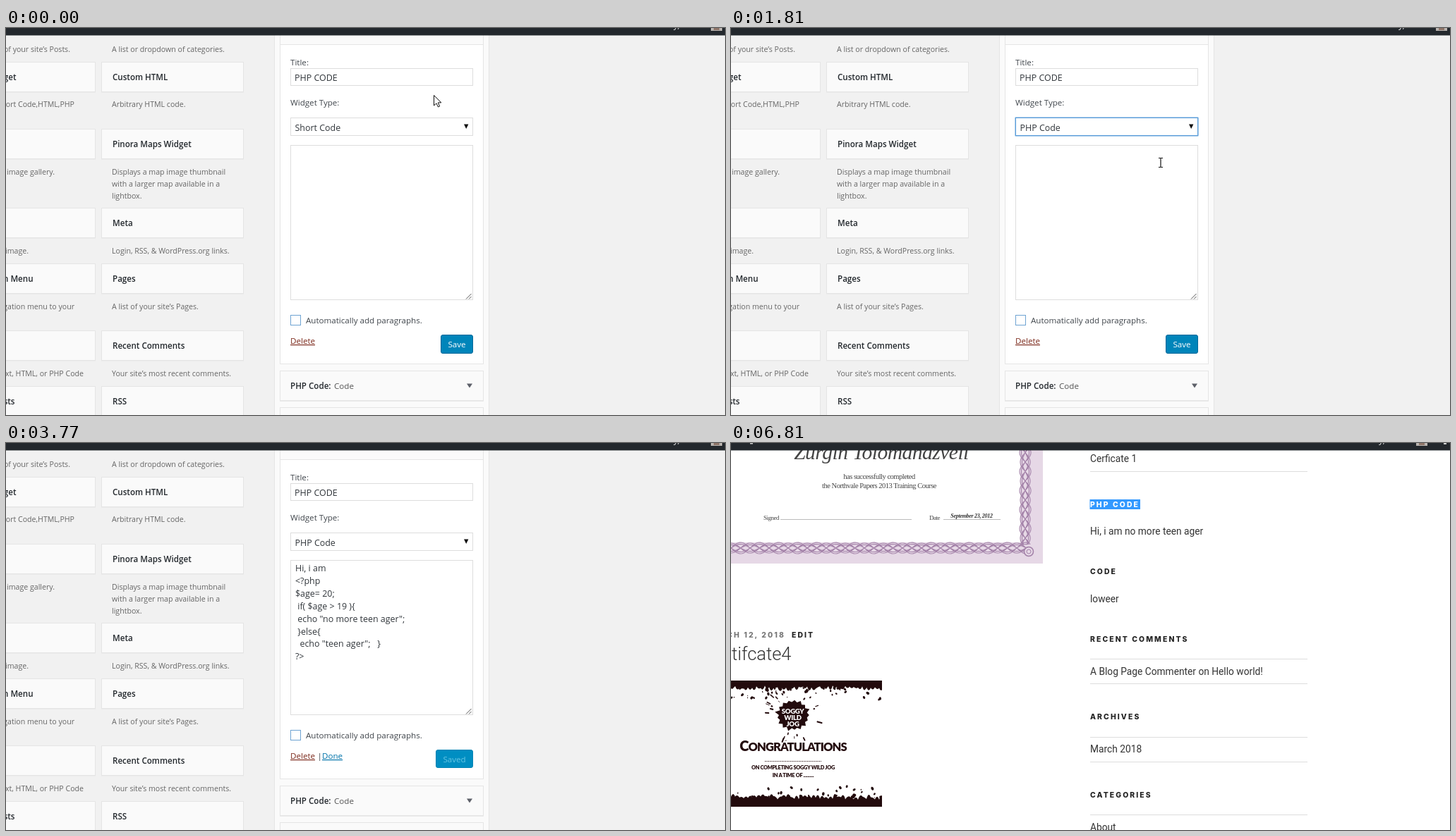
An HTML page that plays this animation: 1019 px wide and 549 px high, repeating every 7.74 s.

```html
<!DOCTYPE html>
<html lang="en">
<head>
<meta charset="utf-8">
<title>Widget demo</title>
<style>
html, body { margin: 0; height: 100%; overflow: hidden; background: #fff; }
svg { display: block; width: 100%; height: 100%; }
text { white-space: pre; font: 11.6px "Open Sans", "Noto Sans", sans-serif; fill: #40464c; }
.desc { font-size: 10.6px; fill: #666; }
.name { font-size: 11.6px; font-weight: 600; fill: #23282d; }
.field { font-size: 12.45px; fill: #32373c; }
.end { text-anchor: end; }
.mid { text-anchor: middle; }
.head { font: 800 10.4px Inter, sans-serif; letter-spacing: 2.1px; fill: #222; }
.body { font: 13.75px Roboto, sans-serif; fill: #333; }
.post { font: 300 25.5px Roboto, sans-serif; fill: #333; }
.cert { font: 10.5px "Liberation Serif", serif; letter-spacing: -.5px; fill: #444; }
.person { font: italic 29.5px "Liberation Serif", serif; letter-spacing: -.5px; fill: #444; }
.date { font: italic bold 8px "Liberation Serif", serif; letter-spacing: -.3px; fill: #333; }
.mud { font: 900 7.4px Lato, sans-serif; letter-spacing: -.3px; fill: #230b0d; }
</style>
</head>
<body>
<svg id="stage" viewBox="0 0 1019 549" preserveAspectRatio="none"></svg>
<script>
const LOOP = 7740, BLUE = '#5b9dd9', MUD = '#230b0d';

const text = (x, y, s, cls = '', attr = '') =>
  `<text x="${x}" y="${y}" class="${cls}" ${attr}>${s}</text>`;
const rect = (x, y, w, h, fill, attr = '') =>
  `<rect x="${x}" y="${y}" width="${w}" height="${h}" fill="${fill}" ${attr}/>`;
const frame = (x, y, w, h, fill, stroke, attr = '') =>
  rect(x + .5, y + .5, w - 1, h - 1, fill, `stroke="${stroke}" ${attr}`);
const path = (d, attr = '') => `<path d="${d}" ${attr}/>`;
const group = (id, s, attr = '') => `<g id="${id}" ${attr}>${s}</g>`;
const line = (x1, x2, y, color) => rect(x1, y, x2 - x1, 1, color);
const glow = (x, y, w, h) =>
  frame(x - 1, y - 1, w + 2, h + 2, 'none', BLUE, 'stroke-opacity=".5" rx="1"') + frame(x, y, w, h, 'none', BLUE);

let seed = 7;
const rand = (lo = 0, hi = 1) => {
  seed = seed * 16807 % 2147483647;
  return lo + (hi - lo) * seed / 2147483647;
};

const topBar = (shift) => rect(0, 0, 1019, 10.5, '#23282d') +
  text(946 - shift, 0, 'y,', 'field', 'style="fill:#eee"') +
  rect(999 - shift, 0, 16, 4, '#b9b4b0') + rect(1003 - shift, 0, 8, 3, '#8d7468');

/* ---- admin page ---- */
function adminPage() {
  const rows = [
    [48, 'Widget', 14, 'Custom HTML'],
    [143, '', 0, 'Pinora Maps Widget'],
    [255, '', 0, 'Meta'],
    [334, 'Navigation Menu', 38, 'Pages'],
    [429, '', 0, 'Recent Comments'],
    [508, 'Recent Posts', 12, 'RSS']
  ];
  const left = [
    [34, 91, 'of your site’s Posts.'], [112, 97, 'Short Code,HTML,PHP'],
    [208, 69, 'an image gallery.'], [320, 32, 'an image.'],
    [399, 97, 'navigation menu to your'], [494, 110, 'Text, HTML, or PHP Code']
  ];
  const right = [
    [34, 'A list or dropdown of categories.'], [112, 'Arbitrary HTML code.'],
    [208, 'Displays a map image thumbnail'], [225, 'with a larger map available in a'], [242, 'lightbox.'],
    [320, 'Login, RSS, &amp; WordPress.org links.'], [399, 'A list of your site’s Pages.'],
    [494, 'Your site’s most recent comments.']
  ];
  const card = (x, y, w, h = 43) => rect(x, y + h, w, 1, '#ebebeb') + frame(x, y, w, h, '#fafafa', '#e5e5e5');
  let s = rect(0, 0, 1019, 549, '#f1f1f1');
  for (const [y, a, end, b] of rows)
    s += card(-80, y, 207) + card(135, y, 202) + text(end + .5, y + 26, a, 'name end') + text(151, y + 26, b, 'name');
  for (const [y, x, a] of left) s += text(x, y, a, 'desc end');
  for (const [y, a] of right) s += text(150, y, a, 'desc');

  s += frame(380, -5, 305, 560, '#fafafa', '#e5e5e5') +
    frame(388, -5, 289, 482, '#fff', '#e5e5e5') + rect(389, 0, 287, 23, '#fafafa') + line(388, 677, 23, '#e5e5e5') +
    card(388, 486, 289) + card(388, 538, 289) +
    text(403, 512, 'PHP Code:', 'name') + text(465, 512, 'Code', '', 'style="fill:#555"') +
    path('M653 504.5h8l-4 6z', 'fill="#5d6069"');

  s += text(403, 53, 'Title:') + frame(403, 57, 259, 25, '#fff', '#ddd') + text(409, 74.5, 'PHP CODE', 'field') +
    text(403, 110, 'Widget Type:') +
    frame(403, 127, 259, 26, '#fff', '#ddd') + group('pickGlow', glow(403, 127, 259, 26)) +
    text(409.5, 145.5, '', 'field', 'id="picked"') + path('M649 136.5h6.4l-3.2 6.5z', 'fill="#111"') +
    frame(403, 166, 259, 220, '#fff', '#ddd') + group('areaGlow', glow(403, 166, 259, 220)) +
    path('M652 384.5l7.5-7.5M656 384.5l3.5-3.5', 'stroke="#555" fill="none"');

  const code = ['Hi, i am', '&lt;?php', '$age= 20;', ' if( $age &gt; 19 ){', ' echo "no more teen ager";',
    ' }else{', '  echo "teen ager";   }', '?&gt;'];
  s += group('code', code.map((c, i) => text(410, 182 + i * 17.9, c, 'field')).join('')) +
    rect(410, 169, 1, 18, '#000', 'id="caret"');

  s += frame(403, 407, 15, 15, '#fff', '#6ea3d2') + text(425, 418.5, 'Automatically add paragraphs.') +
    text(403, 448, 'Delete', '', 'style="fill:#7c2a1c" text-decoration="underline"') +
    group('save', frame(616, 435, 46, 27, '#0085ba', '#006799', 'rx="2.5"') +
      text(639, 453, 'Save', 'mid', 'style="fill:#fff"')) +
    group('saveGlow', frame(614, 433, 50, 31, 'none', '#33b3db', 'rx="4"')) +
    group('saved', text(441.5, 448, '|') +
      text(448, 448, 'Done', '', 'style="fill:#0073aa" text-decoration="underline"') +
      frame(609, 435, 53, 26, '#008ec2', '#0083b4', 'rx="2.5"') +
      text(635.5, 453, 'Saved', 'mid', 'style="fill:#66c6e4"'));

  const items = ['Short Code', 'PHP Code', 'HTML', 'Text'];
  s += group('list', frame(403, 153, 259, 78, '#fff', BLUE) + rect(404, 153, 257, 20, '#1e90ff', 'id="hover"') +
    items.map((c, i) => text(409.5, 168 + i * 19, c, 'field', `id="item${i}"`)).join(''));
  return s + topBar(0);
}

/* ---- site page ---- */
function braid(length, place) {
  let d = '';
  for (const [amp, phase] of [[8, 0], [-8, 0], [5.5, 0], [-5.5, 0], [7, 1.57], [-7, 1.57], [4.5, 1.57], [-4.5, 1.57]])
    for (let u = 0; u <= length; u += 2)
      d += (u ? 'L' : 'M') + place(u, amp * Math.sin(u * Math.PI / 27 + phase)).map(v => v.toFixed(1));
  return d;
}

function certificate() {
  return rect(0, 0, 442, 171, '#e6d8e6') + rect(0, 0, 410, 141, '#fff') +
    path(braid(420, (u, v) => [u, 149 + v]) + braid(144, (u, v) => [417 + v, u]),
      'fill="none" stroke="#a381a8" stroke-width="1.1"') +
    `<circle cx="422" cy="154" r="6.5" fill="#e6d8e6" stroke="#a381a8" stroke-width="1.5"/>` +
    `<circle cx="422" cy="154" r="3" fill="none" stroke="#a381a8"/>` +
    text(213, 23, 'Zurgin Tolomandzveli', 'person mid') +
    text(210, 51, 'has successfully completed', 'cert mid') +
    text(210, 64, 'the Northvale Papers 2013 Training Course', 'cert mid') +
    text(46, 108.5, 'Signed', 'cert', 'style="font-size:9px"') + line(70, 256, 108, '#bbb') +
    text(281, 108.5, 'Date', 'cert', 'style="font-size:9px"') + line(301, 382, 108, '#bbb') +
    text(341, 106, 'September 23, 2012', 'date mid');
}

function edge(base, dir) {
  const rim = dir > 0 ? 337 : 516;
  let d = `M-4 ${rim}L-4 ${base}`, dots = '';
  for (let x = 0; x < 217; x += 6)
    d += `Q${x - 3} ${base + dir * rand(-1, 9)} ${x} ${base + dir * rand(-3, 2)}`;
  for (let i = 0; i < 46; i++) {
    const x = rand(0, 213), y = base + dir * rand(0, 1) ** 2 * 17, r = rand(.4, 1.9);
    dots += `<ellipse cx="${x}" cy="${y}" rx="${r}" ry="${r * 1.4}" transform="rotate(${rand(-60, 60)} ${x} ${y})"/>`;
  }
  return path(d + `L217 ${rim}Z`) + dots;
}

function splat(cx, cy) {
  let d = '', drops = '';
  const at = (a, r) => `${(cx + r * Math.cos(a)).toFixed(1)} ${(cy + r * .93 * Math.sin(a)).toFixed(1)}`;
  for (let i = 0; i < 34; i++) {
    const a = i * Math.PI / 17;
    d += (i ? 'L' : 'M') + at(a, i % 2 ? 20 : rand(22, 27));
  }
  for (let i = 0; i < 26; i++) {
    const a = rand(0, 6.28), r = rand(27, 40);
    drops += path(`M${at(a, r)}L${at(a, r + rand(.5, 6))}`, `stroke-width="${rand(.8, 2.6)}"`);
  }
  return path(d + 'Z') + `<g stroke="${MUD}" stroke-linecap="round">${drops}</g>`;
}

function mudPoster() {
  const badge = ['SOGGY', 'WILD', 'JOG'].map((w, i) =>
    text(87.5, 383.5 + i * 9, w, 'mud mid', 'style="fill:#fff;font-size:9.6px"')).join('');
  return `<clipPath id="poster">${rect(0, 337, 214, 179, '#000')}</clipPath>` +
    `<g clip-path="url(#poster)" fill="${MUD}">${edge(347, 1)}${edge(503, -1)}${splat(88, 386)}</g>` + badge +
    text(88, 437, '<tspan font-size="20">C</tspan>ONGRATULATIONS', 'mud mid', 'style="font-size:16.5px;letter-spacing:-.9px"') +
    path('M48 451.5H128', `stroke="${MUD}" stroke-dasharray="1.2 1.2"`) +
    text(88, 463, 'ON COMPLETING SOGGY WILD JOG', 'mud mid') +
    text(88, 473.5, 'IN A TIME OF ..........', 'mud mid');
}

function sitePage() {
  const heads = [[186, 'CODE'], [282, 'RECENT COMMENTS'], [392, 'ARCHIVES'], [503, 'CATEGORIES']];
  const lines = [[27, 'Cerficate 1'], [130, 'Hi, i am no more teen ager'], [225.5, 'loweer'],
    [328.5, 'A Blog Page Commenter on Hello world!'], [439, 'March 2018'], [550, 'About']];
  return rect(0, 0, 1019, 549, '#fff') + certificate() + mudPoster() +
    text(77, 276, 'MARCH 12, 2018', 'head end', 'style="fill:#767676"') + text(86, 276, 'EDIT', 'head') +
    text(85.5, 308, 'Certifcate4', 'post end') +
    rect(508.5, 80, 71.5, 14, '#3399ff') + text(509, 91, 'PHP CODE', 'head', 'style="fill:#fff"') +
    heads.map(([y, s]) => text(509, y, s, 'head')).join('') +
    lines.map(([y, s]) => text(509, y, s, 'body')).join('') +
    [40, 306, 341, 417, 452, 527].map(y => line(509, 817, y, '#ddd')).join('') +
    topBar(28) + rect(27, 0, 4, 1.5, '#ccc') + rect(1010, 0, 4, 2, '#ccc');
}

const pointers =
  group('arrow', path('M.5 .5V15L4 11.8 6.4 17 8.6 16 6.3 10.9H10.8Z', 'fill="#fff" stroke="#111"')) +
  group('beam', path('M-3 -6.5H-.8L0 -6 .8 -6.5H3M0 -6V6M-3 6.5H-.8L0 6 .8 6.5H3', 'fill="none" stroke="#111" stroke-width="1.2"')) +
  group('hand', path('M-1.5 10V1.5Q0 -.5 1.5 1.5V6Q4 5 4.5 6.8 7 6 7.3 7.8 9 7.5 9.2 9V13L7.5 17.5H0L-4.5 11Q-4 8.5 -1.5 10Z', 'fill="#fff" stroke="#111"'));

stage.innerHTML = group('admin', adminPage()) + group('site', sitePage()) + group('pointer', pointers);

/* ---- timing ---- */
const bursts = [[70, 240, 3], [390, 620, 4], [790, 870, 2], [1020, 1250, 4], [1330, 1510, 3], [1660, 2150, 7],
  [2520, 2520, 1], [2670, 3380, 10], [3480, 3770, 5], [4260, 4260, 1], [4490, 4810, 5], [4960, 5680, 10],
  [5850, 6570, 10], [6650, 6810, 3]];
// pointer route: time, x, y
const route = [[0, 606, 95], [155, 599, 84], [240, 601, 74], [310, 601, 74], [620, 638, 143], [940, 638, 143],
  [1250, 620, 172], [1510, 612, 178], [1580, 612, 178], [2070, 602, 216], [2590, 602, 216], [3380, 654, 443],
  [3410, 654, 443], [3700, 664, 448], [4490, 544, 140], [4810, 516, 75], [4880, 516, 75], [5200, 512, 112],
  [5360, 533, 114], [5520, 590, 114], [5680, 513, 114], [5770, 513, 115], [6570, 923, 518], [6730, 920, 540],
  [LOOP, 920, 549]];

function snap(t) {
  const burst = bursts.findLast(b => b[0] <= t);
  if (!burst) return 0;
  const [first, last, steps] = burst, d = (last - first) / (steps - 1) || 1;
  return Math.min(last, first + Math.floor((t - first) / d + 1e-4) * d);
}

function locate(t) {
  const i = route.findIndex(k => k[0] > t);
  const [t0, x0, y0] = route[i - 1], [t1, x1, y1] = route[i], p = (t - t0) / (t1 - t0);
  return [x0 + (x1 - x0) * p, y0 + (y1 - y0) * p];
}

const el = id => document.getElementById(id);
const show = (id, on) => { el(id).style.display = on ? '' : 'none'; };

function draw(now) {
  const t = snap(now % LOOP), [x, y] = locate(t), within = (a, b) => t >= a - 1 && t < b - 1;
  show('admin', within(0, 4260));
  show('site', !within(0, 4260));

  show('pickGlow', within(790, 2150));
  show('list', within(870, 1660));
  el('picked').textContent = within(0, 1660) ? 'Short Code' : 'PHP Code';
  const hot = y > 172.5 ? 1 : 0;
  el('hover').setAttribute('y', 153 + hot * 19.5);
  for (let i = 0; i < 4; i++) el('item' + i).style.fill = i === hot ? '#fff' : '';

  show('areaGlow', within(2150, 3480));
  show('code', within(2520, 4260));
  show('caret', within(2150, 3000));
  el('caret').setAttribute('transform', within(2520, 3480) ? 'translate(14.5 125)' : '');

  show('save', within(0, 3690));
  show('saveGlow', within(3480, 3690));
  show('saved', within(3690, 4260));

  const beam = within(1660, 3480) && y < 386, hand = within(2670, 3690) && y > 430;
  show('beam', beam);
  show('hand', hand);
  show('arrow', !beam && !hand);
  show('pointer', !within(3770, 4490) && !within(6810, LOOP));
  el('pointer').setAttribute('transform', `translate(${Math.round(x)} ${Math.round(y)})`);
  requestAnimationFrame(draw);
}
requestAnimationFrame(draw);
</script>
</body>
</html>
```
